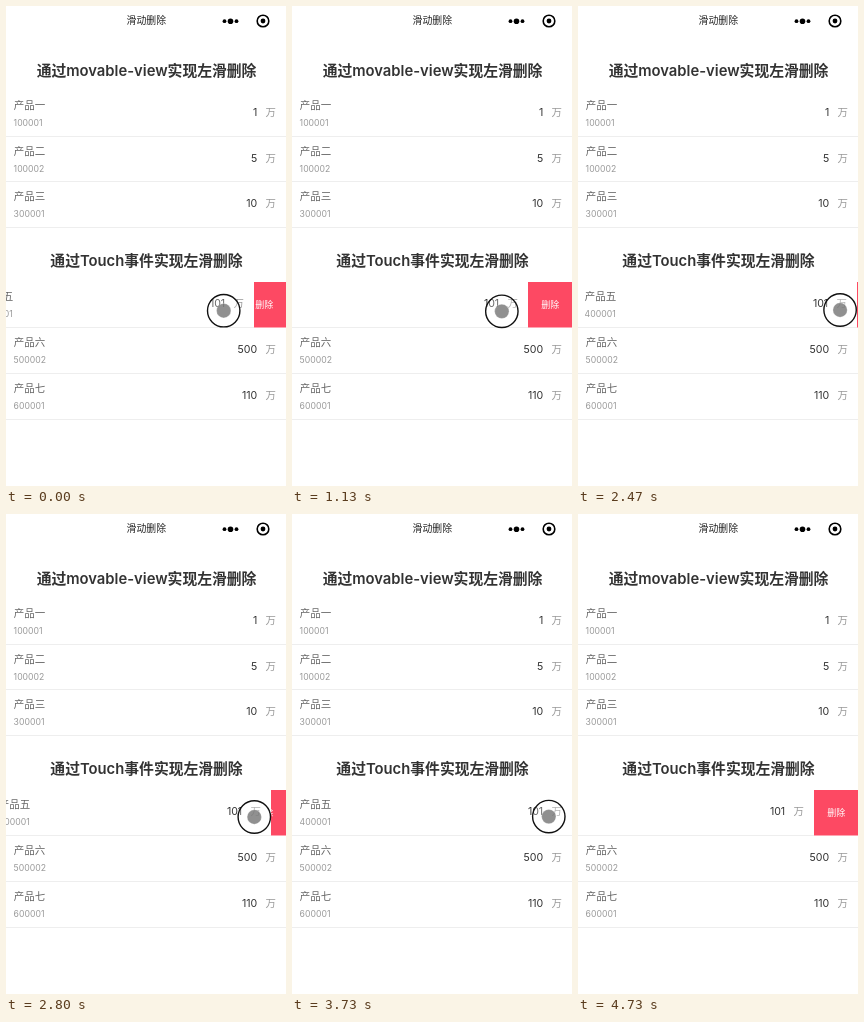
Recreate the animation shown at these times as an HTML page. Size 280 by 480 pixels, loop 4.99 s.

```html
<!DOCTYPE html>
<html lang="zh">
<head>
<meta charset="utf-8">
<title>滑动删除</title>
<style>
  html, body { margin: 0; width: 100%; height: 100%; overflow: hidden; background: #fff; }
  svg { display: block; width: 100%; height: 100%; font-family: Inter, "Noto Sans CJK SC", "Noto Sans CJK", sans-serif; }
  .bar { font-size: 9.9px; fill: #222; text-anchor: middle; }
  .head { font-size: 14.8px; font-weight: 600; fill: #333; text-anchor: middle; }
  .name { font-size: 10.5px; fill: #666; }
  .code { font-size: 8.7px; fill: #999; }
  .num { font-size: 10.6px; fill: #333; text-anchor: end; }
  .unit { font-size: 10.4px; fill: #999; }
  .del { font-size: 9px; fill: #fff; text-anchor: middle; }
  .line { stroke: #eee; }
</style>
</head>
<body>
<svg viewBox="0 0 280 480">
  <rect width="280" height="480" fill="#fff"/>
  <text class="bar" x="140.3" y="18.2">滑动删除</text>
  <g>
    <circle cx="218.5" cy="15.2" r="1.9"/>
    <circle cx="224.5" cy="15.2" r="2.8"/>
    <circle cx="230.5" cy="15.2" r="1.9"/>
    <circle cx="257" cy="15" r="2.4"/>
    <circle cx="257" cy="15" r="5.8" fill="none" stroke="#000" stroke-width="1.6"/>
  </g>
  <text class="head" x="140.5" y="69.8">通过movable-view实现左滑删除</text>
  <text class="head" x="140.5" y="260.3">通过Touch事件实现左滑删除</text>
  <g id="rows"></g>
  <rect x="236" y="276" width="44" height="45.5" fill="#fd4963"/>
  <text class="del" x="258.3" y="302.3">删除</text>
  <g id="slider"></g>
  <g id="cursor">
    <circle id="ring" r="16.2" fill="#fff" fill-opacity=".25" stroke="#111" stroke-width="1.4"/>
    <circle r="7.2" fill="#777" fill-opacity=".82" stroke="#fff" stroke-opacity=".35" stroke-width=".8"/>
  </g>
</svg>
<script>
const LOOP = 4990, TICK = 1000 / 15, OPEN = -44, SNAP = 220;
const $ = id => document.getElementById(id);

const row = (y, name, code, num) => `
  <text class="name" x="7.8" y="${y + 18.2}">${name}</text>
  <text class="code" x="7.6" y="${y + 35.4}">${code}</text>
  <text class="num" x="251.2" y="${y + 25.3}">${num}</text>
  <text class="unit" x="259.6" y="${y + 25.2}">万</text>
  <line class="line" x1="-60" x2="280" y1="${Math.floor(y + 45) + .5}" y2="${Math.floor(y + 45) + .5}"/>`;

$('rows').innerHTML =
  row(85, '产品一', '100001', 1) + row(130.5, '产品二', '100002', 5) +
  row(176, '产品三', '300001', 10) + row(322, '产品六', '500002', 500) +
  row(368, '产品七', '600001', 110);
$('slider').innerHTML =
  '<rect x="-60" y="275.5" width="340" height="46" fill="#fff"/>' +
  row(276, '产品五', '400001', 101);

// Pointer stops: [ms, x, y], eased in between
const stops = [
  [-250, 249.5, 304], [150, 203, 305], [333, 206, 305], [600, 258, 305],
  [1000, 206, 305], [1070, 206, 305], [1500, 271.4, 311], [1820, 271.4, 311],
  [2200, 262.3, 304], [2440, 262.3, 304], [2800, 248.3, 303], [2870, 248.3, 303],
  [3150, 232, 303], [3733, 256.8, 302.6], [4400, 209, 303], [4533, 233, 303], [4667, 252, 348]];

// Each drag moves the row with the pointer, then the row snaps shut or open
const drags = [
  { down: -250, up: 250, from: 0, to: OPEN },
  { down: 930, up: 1440, from: OPEN, to: 0 },
  { down: 2130, up: 3300, from: 0, to: 0 },
  { down: 3700, up: 4400, from: 0, to: OPEN }];

const smooth = p => p * p * (3 - 2 * p);
const mix = (a, b, p) => a + (b - a) * p;

function pointer(t) {
  const i = stops.findIndex(s => s[0] > t);
  if (i < 0) return stops[stops.length - 1].slice(1);
  const [t0, x0, y0] = stops[i - 1], [t1, x1, y1] = stops[i];
  const p = smooth((t - t0) / (t1 - t0));
  return [mix(x0, x1, p), mix(y0, y1, p)];
}

function offset(t, drag) {
  const grip = Math.max(drag.down, stops[0][0]);
  const pull = time => Math.max(OPEN, drag.from + pointer(time)[0] - pointer(grip)[0]);
  if (t < drag.up) return pull(t);
  return mix(pull(drag.up), drag.to, smooth(Math.min(1, (t - drag.up) / SNAP)));
}

function draw(ms) {
  const t = Math.floor((ms % LOOP + 4) / TICK) * TICK;
  const drag = drags.filter(d => d.down <= t).pop();
  const [x, y] = pointer(t);
  $('slider').setAttribute('transform', `translate(${Math.round(offset(t, drag))})`);
  $('cursor').setAttribute('transform', `translate(${x.toFixed(2)} ${y.toFixed(2)})`);
  $('cursor').setAttribute('visibility', t < 4700 ? 'visible' : 'hidden');
  $('ring').setAttribute('display', t < drag.up ? 'inline' : 'none');
}

const start = performance.now();
function loop() {
  draw(performance.now() - start);
  requestAnimationFrame(loop);
}
loop();
</script>
</body>
</html>
```
